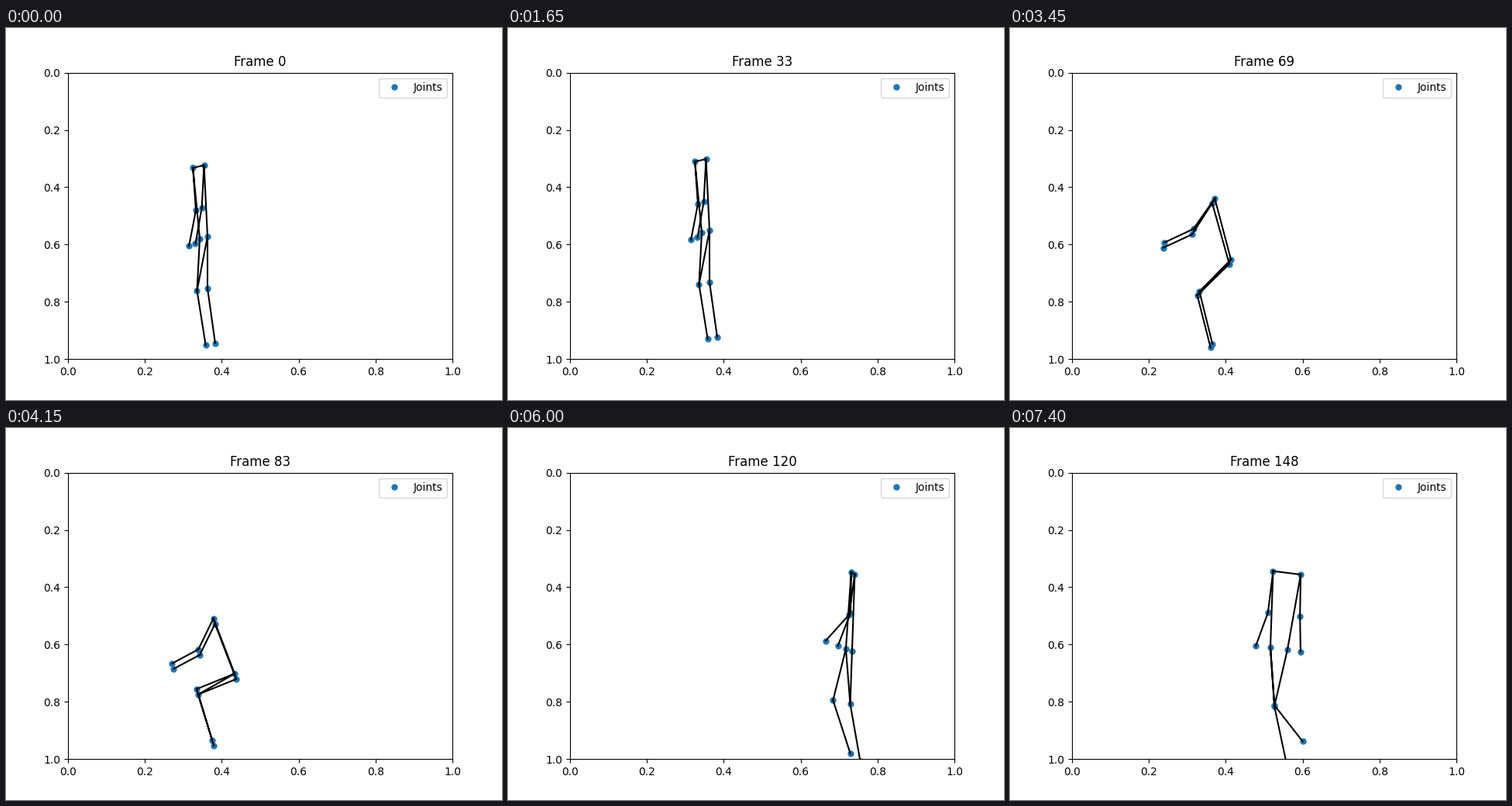
Animation of 640 by 480 pixels, one loop 7450 ms. Source, as a matplotlib script:

```python
import numpy as np
import matplotlib.pyplot as plt
from matplotlib.animation import FuncAnimation

FRAMES, INTERVAL = 149, 50

# Bone lengths in pixels
TORSO, ARM, FOREARM, THIGH, SHIN = 92, 55, 47, 67, 72

# Joint order per side: shoulder, elbow, wrist, hip, knee, ankle
SIDE = [(0, 1), (1, 2), (0, 3), (3, 4), (4, 5)]
BONES = [(0, 6)] + SIDE + [(a + 6, b + 6) for a, b in SIDE] + [(9, 4)]


def pose(left_hip, right_hip, left, right, size=(1, 1, 1, 1)):
    """Angles (torso, arm, forearm, thigh, shin) are degrees from straight down.

    Sizes foreshorten torso, arms, thighs and shins.
    """
    return np.array([*left_hip, *right_hip, *left, *right, *size], float)


def moved(p, dx, dy):
    q = p.copy()
    q[:4] += (dx, dy, dx, dy)
    return q


def swung(p, arm, forearm):
    q = p.copy()
    q[[5, 10]] += arm
    q[[6, 11]] += forearm
    return q


def blend(a, b, t):
    return a + (b - a) * t


def side_joints(hip, angles, size):
    rad = np.radians(angles)
    torso, arm, fore, thigh, shin = np.column_stack([np.sin(rad), np.cos(rad)])
    trunk, arms, thighs, shins = size
    shoulder = hip - TORSO * trunk * torso
    elbow = shoulder + ARM * arms * arm
    wrist = elbow + FOREARM * arms * fore
    knee = hip + THIGH * thighs * thigh
    # A lifted foot points away from the viewer, so the shin looks shorter
    ankle = knee + SHIN * shins * np.cos(rad[4]) * shin
    return [shoulder, elbow, wrist, hip, knee, ankle]


def skeleton(p):
    """Joint positions in axes coordinates."""
    xy = side_joints(p[:2], p[4:9], p[14:]) + side_joints(p[2:4], p[9:14], p[14:])
    return (np.array(xy) - (80, 57.6)) / (496, 369.6)


stand = pose((250, 272), (260, 269), (5.5, 4, -11, -3, 9), (2.8, -3, -10, 0, 8))
tall = moved(stand, 0, -8)
ready = moved(stand, 6, -5)
bend = (21, -26, -62, -68, 17)
squat = pose((297, 324), (295, 317), bend, bend, (.83, .81, .79, 1))
stoop = pose((363, 246), (372, 266), (124, -27, -16, -10, 1),
             (133, 24, -34, -16, 12), (.61, .4, .72, .92))
upright = pose((391, 288), (383, 285), (-2, -8, -42, -2, 10),
               (-4, -1, -21, -14, 18), (1.08, .96, 1.02, 1.06))
step = pose((358, 286), (336, 283), (-10, -1, 1, -13, 12),
            (-2, -7, -20, 4, 38), (1.07, .98, 1.12, 1.04))

KEYS = [(0, stand), (15, tall), (44, tall), (53, ready),
        (70, swung(blend(ready, squat, 0.7), -18, -22)), (83, squat),
        (92, squat), (106, stoop), (118, moved(upright, 60, 0)),
        (135, upright), (148, step)]
TIMES = [t for t, _ in KEYS]


def joints_at(n):
    i = min(np.searchsorted(TIMES, n, side="right") - 1, len(KEYS) - 2)
    (t0, a), (t1, b) = KEYS[i], KEYS[i + 1]
    return skeleton(blend(a, b, (n - t0) / (t1 - t0)))


fig, ax = plt.subplots(figsize=(6.4, 4.8), dpi=100)
ax.set_xlim(0, 1)
ax.set_ylim(1, 0)
dots, = ax.plot([], [], "o", color="C0", markersize=5, label="Joints")
bones, = ax.plot([], [], "k-", lw=1.5)
title = ax.set_title("Frame 0")
ax.legend(loc="upper right")


def update(n):
    p = joints_at(n)
    dots.set_data(p[:, 0], p[:, 1])
    # NaN rows split the path into separate bones
    path = np.array([q for a, b in BONES for q in (p[a], p[b], (np.nan, np.nan))])
    bones.set_data(path[:, 0], path[:, 1])
    title.set_text(f"Frame {n}")
    return dots, bones, title


anim = FuncAnimation(fig, update, frames=FRAMES, interval=INTERVAL,
                     repeat=True, repeat_delay=0)
plt.show()
```
